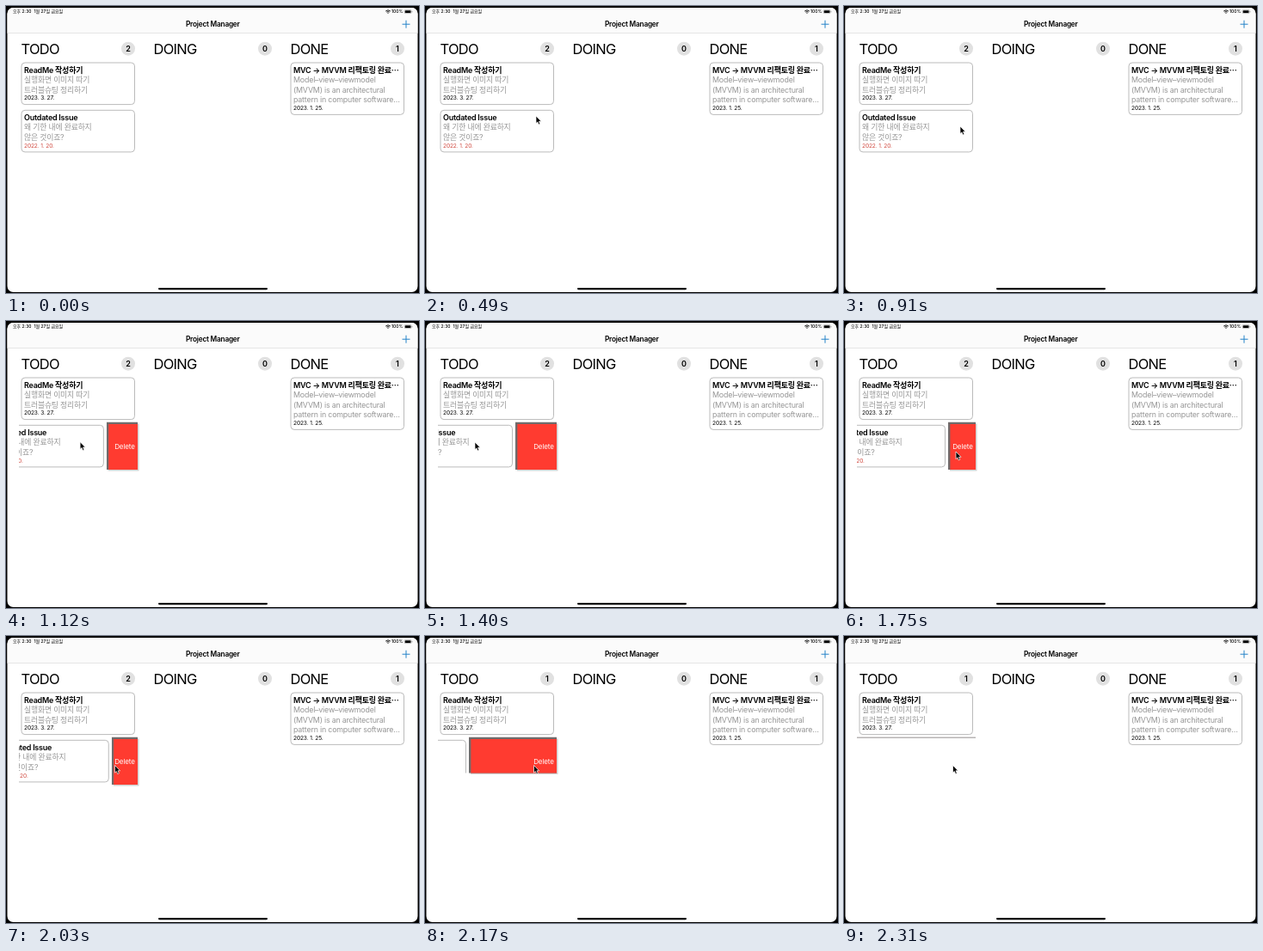
An HTML page that plays this animation: 480 by 334 pixels, repeating every 2.38 s.

```html
<!DOCTYPE html>
<html lang="ko">
<head>
<meta charset="utf-8">
<title>Project Manager</title>
<style>
  html, body { margin: 0; width: 100%; height: 100%; overflow: hidden; background: #000; }
  svg { display: block; width: 480px; height: 334px; }
  text { font-family: Inter, "Noto Sans CJK KR", "Noto Sans CJK", sans-serif; white-space: pre; }
  .bar { font-size: 5px; font-weight: 500; }
  .nav { font-size: 8.3px; font-weight: 600; letter-spacing: -.23px; text-anchor: middle; }
  .head { font-size: 16.5px; letter-spacing: -.75px; }
  .count { font-size: 9px; font-weight: 600; text-anchor: middle; }
  .title { font-size: 9px; font-weight: 600; letter-spacing: -.25px; }
  .body { font-size: 8.9px; letter-spacing: -.2px; fill: #969696; }
  .date { font-size: 6.6px; letter-spacing: -.12px; }
  .late { fill: #d0483e; }
  .delete { font-size: 8px; letter-spacing: -.1px; fill: #fff; text-anchor: middle; }
  .card { fill: #fff; stroke: #b4b4b4; stroke-width: .9; }
</style>
</head>
<body>
<svg viewBox="0 0 480 334">
  <defs>
    <clipPath id="screen"><rect x="1.5" y="2" width="477" height="331" rx="7"/></clipPath>
    <clipPath id="rowClip"><rect id="rowBox" x="15" y="117.5" width="138"/></clipPath>
  </defs>
  <rect width="480" height="334"/>
  <g clip-path="url(#screen)">
    <rect width="480" height="334" fill="#fff"/>
    <rect width="480" height="31" fill="#fbfbfb"/>
    <path d="M0 31.5H480" stroke="#e6e6e6"/>
  </g>

  <text class="bar" x="8" y="8.3">오후 2:30</text>
  <text class="bar" x="32.5" y="8.3">1월 27일 금요일</text>
  <text class="bar" x="448" y="8.3">100%</text>
  <g fill="none" stroke="#000" stroke-width=".9">
    <path d="M441.2 6Q444 3.6 446.8 6M442.4 7.2Q444 5.9 445.6 7.2"/>
    <circle cx="444" cy="8.2" r=".2"/>
    <rect x="463" y="4.6" width="8.2" height="4" rx="1.2" stroke="#888" stroke-width=".5"/>
  </g>
  <rect x="463.7" y="5.3" width="6.8" height="2.6" rx=".7"/>
  <path d="M472 5.9v1.4" stroke="#888" stroke-width=".6"/>
  <text class="nav" x="240.3" y="24.2">Project Manager</text>
  <path d="M460.5 21.2h9M465 16.7v9" stroke="#2583c8"/>

  <g id="board"></g>

  <g id="row">
    <g id="action">
      <rect id="shade" y="119.5" opacity=".18"/>
      <g clip-path="url(#rowClip)">
        <rect id="back" y="117.5" height="56" fill="#706a6a"/>
        <rect id="red" y="120" height="53" fill="#ff3b30"/>
        <text class="delete" x="138" y="148.5">Delete</text>
      </g>
    </g>
    <g clip-path="url(#rowClip)"><g id="slide"></g></g>
  </g>

  <rect x="177" y="328" width="127" height="2.2" rx="1.1"/>
  <path id="cursor" d="M0 0V8.6L1.9 6.9L3.2 10L4.8 9.3L3.5 6.3H6.1Z" stroke="#fff" stroke-width=".7"/>
</svg>
<script>
const $ = id => document.getElementById(id);
const LOOP = 2380, STEP = 70;
const SHOW = 140, DRAG = 910, HELD = 1400, RELEASE = 1470, REMOVE = 2030, GONE = 2310;

const text = (cls, x, y, s) => `<text class="${cls}" x="${x}" y="${y}">${s}</text>`;

function card(x, y, title, lines, date, late = '') {
  const h = 25 + 11.8 * lines.length;
  return `<rect class="card" x="${x}" y="${y}" width="131.5" height="${h}" rx="4"/>` +
    text('title', x + 3, y + 11.5, title) +
    lines.map((s, i) => text('body', x + 3, y + 22.7 + 11.8 * i, s)).join('') +
    text('date ' + late, x + 3, y + h - 5.3, date);
}

function column(x, badgeX, name, count, id) {
  return text('head', x, 56, name) +
    `<circle cx="${badgeX}" cy="49.7" r="8" fill="#e1e1e1"/>` +
    `<text id="${id}" class="count" x="${badgeX}" y="53">${count}</text>`;
}

$('board').innerHTML =
  column(17.5, 142, 'TODO', 2, 'todo') +
  column(171.5, 301, 'DOING', 0, 'doing') +
  column(330.5, 455, 'DONE', 1, 'done') +
  card(18, 66, 'ReadMe 작성하기', ['실행화면 이미지 따기', '트러블슈팅 정리하기'], '2023. 3. 27.') +
  card(331, 66, 'MVC → MVVM 리팩토링 완료⋯',
    ['Model–view–viewmodel', '(MVVM) is an architectural', 'pattern in computer software…'], '2023. 1. 25.');
$('slide').innerHTML = '<rect x="15" y="117" width="138" height="57" fill="#fff"/>' +
  card(18, 121.3, 'Outdated Issue', ['왜 기한 내에 완료하지', '않은 것이죠?'], '2022. 1. 20.', 'late');

const progress = (t, from, to) => Math.min(1, Math.max(0, (t - from) / (to - from)));
const easeOut = (u, power) => 1 - (1 - u) ** power;

// The pointer eases from each stop to the next: start, end, x, y
const moves = [
  [SHOW, 280, 84, 88],
  [350, 490, 129, 128],
  [490, DRAG, 135, 140],
  [DRAG, HELD, 58, 141],
  [RELEASE, 1750, 130, 152],
  [1820, REMOVE, 126.5, 150.5]
];

function pointer(t) {
  let x = 210, y = 304;
  for (const [start, end, toX, toY] of moves) {
    const u = easeOut(progress(t, start, end), 1.8);
    x += (toX - x) * u;
    y += (toY - y) * u;
  }
  return [x, y];
}

// Dragged open against resistance, settled back to the button, then swept away
function swipe(t) {
  if (t < RELEASE) return 48 * easeOut(progress(t, DRAG, HELD), 2.5);
  const rest = 30 + 18 * Math.exp((RELEASE - t) / 127);
  return rest + (138 - rest) * progress(t, REMOVE, GONE - STEP);
}

function span(id, x, end) {
  $(id).setAttribute('x', x);
  $(id).setAttribute('width', Math.max(0, end - x));
}

function draw(t) {
  const [x, y] = pointer(t), dx = swipe(t), edge = 153 - dx;
  const h = 1 + 54.5 * (1 - progress(t, REMOVE, GONE) ** 2);
  $('cursor').setAttribute('visibility', t < SHOW ? 'hidden' : 'visible');
  $('cursor').setAttribute('transform', `translate(${x} ${y})`);
  $('slide').setAttribute('transform', `translate(${-dx} 0)`);
  $('action').setAttribute('visibility', dx ? 'visible' : 'hidden');
  span('shade', edge + 2, 154.5);
  span('back', edge, 153);
  span('red', edge + 2.4, 153);
  $('rowBox').setAttribute('height', h);
  $('shade').setAttribute('height', h > 2 ? h - .5 : 0);
  $('todo').textContent = t > REMOVE ? 1 : 2;
}

function tick() {
  draw(Math.floor(performance.now() % LOOP / STEP) * STEP);
  requestAnimationFrame(tick);
}
tick();
</script>
</body>
</html>
```
